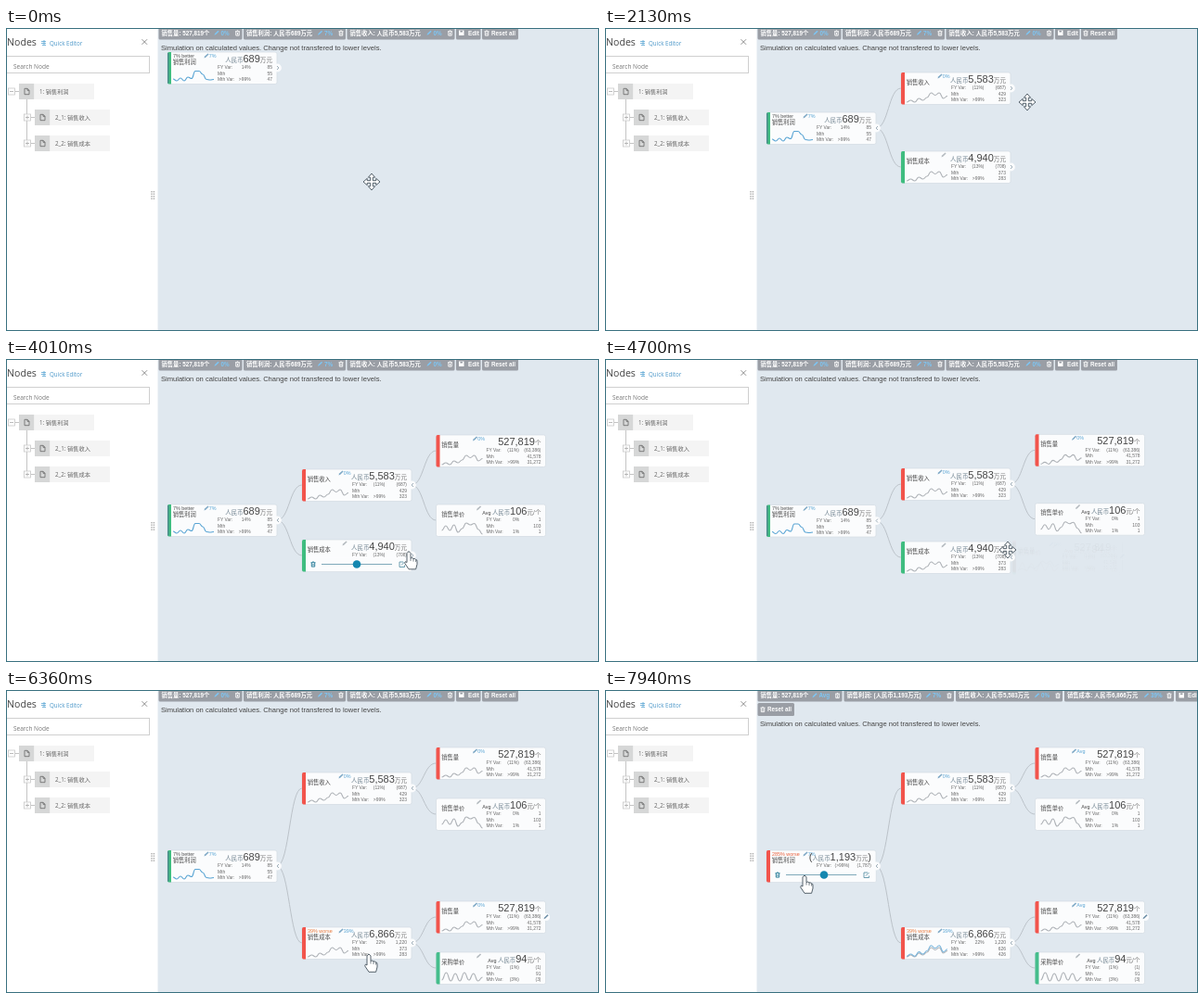
These frames come from a looping animation (639x327 px, 8 s). An HTML page:

```html
<!DOCTYPE html>
<html lang="zh">
<head>
<meta charset="utf-8">
<title>Value driver tree</title>
<style>
html, body { margin: 0; width: 100%; height: 100%; overflow: hidden; background: #e0e8ef; }
svg { display: block; }
text { font-family: "Liberation Sans", "Noto Sans CJK SC", "Noto Sans CJK", sans-serif; white-space: pre; }
.side text { font-family: "Open Sans", "Noto Sans CJK SC", "Noto Sans CJK", sans-serif; }
</style>
</head>
<body>
<svg id="stage" width="639" height="327" viewBox="0 0 639 327"></svg>
<script>
const LOOP = 8000;
const GREEN = '#3fbd80', RED = '#f2544c', BLUE = '#5aa5d4', GRAY = '#aeb2b7', SKY = '#7cc6f5';

// ---- drawing helpers ----
const rect = (x, y, w, h, fill, more = '') =>
  `<rect x="${x}" y="${y}" width="${w}" height="${h}" fill="${fill}" ${more}/>`;
const line = (d, stroke, w = 1, more = '') =>
  `<path d="${d}" fill="none" stroke="${stroke}" stroke-width="${w}" ${more}/>`;
const text = (x, y, str, size, fill = '#444', more = '') =>
  `<text x="${x}" y="${y}" font-size="${size}" fill="${fill}" ${more}>${str}</text>`;
const right = 'text-anchor="end"';
const group = (x, y, body) => `<g transform="translate(${x} ${y})">${body}</g>`;

const pencil = (x, y, color) =>
  group(x, y, `<path d="M0 5.2l.6-1.8L4 .2l1.100 1-3.400 3.300z" fill="${color}"/>`);
const trash = (x, y, color) =>
  group(x, y, line('M0 1.2H5M1.8 .4H3.2M.8 1.5V5.6H4.2V1.5M2.5 2.5V4.8', color, .9));

function spark(ys, color) {
  const step = 44 / (ys.length - 1);
  let d = `M6 ${ys[0]}`;
  for (let i = 1; i < ys.length; i++) {
    const x = 6 + i * step, mid = x - step / 2;
    d += `C${mid} ${ys[i - 1]} ${mid} ${ys[i]} ${x} ${ys[i]}`;
  }
  return line(d, color, 1.1);
}

// ---- left panel ----
function treeRow(x, y, w, label, sign) {
  const cy = y + 8.5;
  return line(`M${x - 5} ${cy}H${x}`, '#c4c4c4') +
    rect(x - 11.5, cy - 3.5, 7, 7, '#fff', 'stroke="#c8c8c8" stroke-width=".8"') +
    line(`M${x - 10} ${cy}h4` + (sign ? `M${x - 8} ${cy - 2}v4` : ''), '#aaa', .8) +
    rect(x, y, 16.5, 17, '#d6d7d7') + rect(x + 16.5, y, w - 16.5, 17, '#f4f4f4') +
    line(`M${x + 6} ${cy - 3.2}h3l2 2v4.4h-5zM${x + 9} ${cy - 3.2}v2h2`, '#666', .8) +
    text(x + 22, cy + 2.6, label, 6.2, '#666');
}

function sidePanel() {
  let dots = '';
  for (let i = 0; i < 8; i++) dots += rect(156.3 + i % 2 * 2.4, 176 + (i >> 1) * 2.5, 1.4, 1.4, '#aaa');
  return `<g class="side">${rect(0, 0, 163.5, 327, '#fff')}
    ${text(1, 19.2, 'Nodes', 10.6, '#444')}
    ${line('M38 14.5h5M38 16.5h5M39 18.5h4M41 13v5', BLUE, .8)}
    ${text(47, 19, 'Quick Editor', 6.2, '#4a96c8')}
    ${line('M146.5 12.2l5.6 5.6m0-5.6l-5.6 5.6', '#777', .8)}
    ${rect(.5, 30.5, 154, 18, '#fff', 'stroke="#cfcfcf"')}
    ${text(8, 43.6, 'Search Node', 6.5, '#777')}
    ${line('M22.5 77V124', '#c4c4c4')}
    ${treeRow(14, 60, 81, '1: 销售利润', 0)}
    ${treeRow(31, 88, 81, '2_1: 销售收入', 1)}
    ${treeRow(31, 116, 81, '2_2: 销售成本', 1)}
    ${dots}</g>`;
}

// ---- top bar ----
const barBox = (x, y, w, h) => rect(x, y, w, h, '#9a9ea5', 'rx="1.5"');
const barText = (x, y, s, fill = '#fff') => text(x, y, s, 6.3, fill, 'font-weight="bold"');

function barItem(x, w, y, label, pct) {
  const r = x + w, px = r - 19 - pct.length * 2;
  return barBox(x, -1, w, 13.5) + barText(x + 3, y, label) +
    pencil(px - 7, y - 5, SKY) + barText(px, y, pct, SKY) + trash(r - 7.5, y - 5, '#fff');
}
const saveIcon = (x, y) => rect(x, y, 5.5, 5.5, '#fff') + rect(x + 1.4, y + .4, 2.6, 1.6, '#9a9ea5');
const note = y =>
  text(167, y, 'Simulation on calculated values. Change not transfered to lower levels.', 7.57, '#444');

const barBefore = barItem(164.5, 90, 7.5, '销售量: 527,819个', '0%') +
  barItem(256, 110, 7.5, '销售利润: 人民币689万元', '7%') +
  barItem(367.5, 116, 7.5, '销售收入: 人民币5,583万元', '0%') +
  barBox(485, -1, 26.5, 13.5) + saveIcon(488, 2.5) + barText(498, 7.5, 'Edit') +
  barBox(513, -1, 39, 13.5) + trash(515.5, 2.5, '#fff') + barText(523, 7.5, 'Reset all') + note(24);

const barAfter = barItem(164.5, 91, 8, '销售量: 527,819个', 'Avg') +
  barItem(257.5, 118.5, 8, '销售利润: (人民币1,193万元)', '7%') +
  barItem(378, 115, 8, '销售收入: 人民币5,583万元', '0%') +
  barItem(495, 118, 8, '销售成本: 人民币6,866万元', '39%') +
  barBox(615, -1, 30, 13.5) + saveIcon(618.5, 3) + barText(628, 8, 'Edit') +
  barBox(164.5, 14, 39.5, 14) + trash(167.5, 18, '#fff') + barText(175, 23, 'Reset all') + note(39);

// ---- cards ----
function face(f) {
  const [fy, mth, mv] = f.rows;
  const row = (y, label, a, b) => text(54, y, label, 4.9, '#666') +
    text(89.5, y, a, 4.9, '#666', right) + text(113, y, b, 4.9, '#666', right);
  const span = (size, s, fill = '#777') => `<tspan font-size="${size}" fill="${fill}">${s}</tspan>`;
  const value = (f.avg ? span(5.4, 'Avg ', '#444') : '') + (f.neg ? span(11, '(', '#444') : '') +
    span(6.4, f.pre || '', '#6b7f8c') + span(11, f.num, '#444') + span(6.6, f.unit) + (f.neg ? span(11, ')', '#444') : '');
  return rect(0, 0, 118, 34.5, '#fbfcfd', 'rx="2" stroke="#d3dbe2" stroke-width=".7"') +
    (f.bar ? `<path d="M4 0H1.5Q0 0 0 2V32.5Q0 34.5 1.5 34.5H4Z" fill="${f.bar}"/>` : '') +
    (f.edge ? line('M.8 1V33.500', f.edge, 1.6) : '') +
    (f.note ? text(6, 5.8, f.note, 5.4, f.noteColor || '#555') : '') +
    text(5.7, 12.7, f.title, 6.3, '#4a4a4a') +
    pencil(f.pct ? 39.5 : 43.5, 1.2, f.pct ? '#7fa9c6' : '#b4babf') + (f.pct ? text(44.8, 5.9, f.pct, 5.4, BLUE) : '') +
    `<text x="113" y="11" ${right}>${value}</text>` +
    row(18.2, 'FY Var:', ...fy) + row(25, 'Mth', '', mth) + row(31.2, 'Mth Var:', ...mv) +
    (f.ghost ? spark(f.ghost, GRAY) : '') + spark(f.line, f.ink || GRAY);
}

const slider = (id, thumb) => `<g id="${id}">${rect(4.2, 19.7, 113.3, 14.4, '#fbfcfd')}
  ${trash(9.5, 23.5, '#1d7793')}${line('M21 26.5H97', '#7fa9ba', 1.2)}
  <circle class="thumb" cx="${thumb}" cy="26.5" r="4.3" fill="#1487b0"/>
  ${line('M109 24h-4v5.500h5.500v-2M107 27.500l3.500-3.500', '#5d93a8', .9)}</g>`;

const rising = [32, 30, 32, 28, 30, 27, 22, 24.5, 22, 28, 25.5];
const profitLine = [29, 31, 28, 31, 27, 28.5, 20.5, 20.5, 24, 29.5, 30, 29.5];
const priceLine = [28, 23, 28, 22, 30, 26, 20, 22, 20.5, 27, 32];
const buyLine = [30, 22, 31, 23, 31, 22, 30, 23, 31, 27];

const volume = { title: '销售量', num: '527,819', unit: '个', bar: RED, line: rising, pct: '0%',
  rows: [['(11%)', '(63,386)'], '41,578', ['>99%', '31,272']] };
const profit = { title: '销售利润', pre: '人民币', num: '689', unit: '万元', bar: GREEN, edge: '#4c8f8c',
  line: profitLine, ink: BLUE, note: '7% better', pct: '7%', rows: [['14%', '85'], '55', ['>99%', '47']] };
const revenue = { title: '销售收入', pre: '人民币', num: '5,583', unit: '万元', bar: RED, line: rising, pct: '0%',
  rows: [['(11%)', '(687)'], '429', ['>99%', '323']] };
const cost = { title: '销售成本', pre: '人民币', num: '4,940', unit: '万元', bar: GREEN, line: rising,
  rows: [['(13%)', '(708)'], '373', ['>99%', '283']] };
const costUp = { ...cost, num: '6,866', bar: RED, note: '39% worse', noteColor: '#e8793c', pct: '39%',
  rows: [['22%', '1,220'], '373', ['>99%', '283']] };
const costDone = { ...costUp, rows: [['22%', '1,220'], '626', ['>99%', '426']],
  ghost: rising, line: rising.map(y => y - (31.5 - y) * .15 - .8), ink: '#79b5dc' };
const profitDone = { ...profit, neg: 1, num: '1,193', bar: RED, edge: '', note: '285% worse', noteColor: '#e8603c',
  rows: [['(>99%)', '(1,787)'], '(198)', ['(>99%)', '(206)']] };
const price = { title: '销售单价', avg: 1, pre: '人民币', num: '106', unit: '元/个', line: priceLine,
  rows: [['0%', '1'], '103', ['1%', '1']] };
const buy = { title: '采购单价', avg: 1, pre: '人民币', num: '94', unit: '元/个', bar: '#45bd8c', line: buyLine,
  rows: [['(1%)', '(1)'], '91', ['(3%)', '(3)']] };

const CHANGE = 6150, DONE = 6620;
const volumeDone = { ...volume, pct: 'Avg' };

// y: resting height at each tree stage; born: stage at which the card slides out of its parent
// faces: [look, from, to]
const cards = {
  profit: { x: 174, y: [26, 91, 157, 173], born: 0, opens: 1,
    faces: [[profit, 0, DONE], [profitDone, DONE, LOOP]] },
  revenue: { x: 319, y: [26, 48, 119, 89], born: 1, opens: 2, from: 'profit', faces: [[revenue, 0, LOOP]] },
  cost: { x: 319, y: [26, 133, 195, 256], born: 1, opens: 3, from: 'profit',
    faces: [[cost, 0, CHANGE], [costUp, CHANGE, DONE], [costDone, DONE, LOOP]] },
  volume: { x: 463.5, y: [48, 48, 82, 62], born: 2, from: 'revenue', faces: [[volume, 0, DONE], [volumeDone, DONE, LOOP]] },
  price: { x: 463.5, y: [48, 48, 157, 117], born: 2, from: 'revenue', faces: [[price, 0, LOOP]] },
  volume2: { x: 463.5, y: [195, 195, 195, 228], born: 3, from: 'cost', edit: 1,
    faces: [[volume, 0, DONE], [volumeDone, DONE, LOOP]] },
  buy: { x: 463.5, y: [195, 195, 195, 283], born: 3, from: 'cost', faces: [[buy, 0, LOOP]] }
};
const sliders = { profit: 62, revenue: 59, cost: 59 };

// ---- shown only within time windows ----
const shown = {
  barBefore: [[0, DONE]], barAfter: [[DONE, LOOP]],
  'slide-revenue': [[2560, 3030]],
  'slide-cost': [[3600, 4650], [5530, CHANGE], [DONE, 7200]],
  'slide-profit': [[7680, LOOP]],
  hand: [[800, 1330], [2560, 3080], [3600, 4700], [5530, LOOP]],
  cross: [[0, 800], [1330, 2560], [3080, 3600], [4700, 5530]]
};

function cardMarkup(id) {
  const c = cards[id];
  const looks = c.faces.map(([f, a, b], i) => {
    shown[`${id}-${i}`] = [[a, b]];
    return `<g id="${id}-${i}">${face(f)}</g>`;
  }).join('');
  const knob = c.opens
    ? `<circle cx="118.500" cy="17" r="4.400" fill="#fbfcfd"/>` +
      group(119, 17, `<path class="chev" d="M-1-2L.9 0-1 2" fill="none" stroke="#93a4b0" stroke-width=".9"/>`)
    : c.edit ? `<circle cx="118.500" cy="17" r="4" fill="#fbfcfd"/>` + pencil(116, 14, '#6a8ca5') : '';
  return `<g id="${id}">${looks}${id in sliders ? slider('slide-' + id, sliders[id]) : ''}${knob}</g>`;
}

const arm = 'L-1.300-1.300V-4.800H-3.600L0-9 3.600-4.800H1.300V-1.300H4.800V-3.600L9 0 4.800 3.600V1.300H1.300V4.800H3.600L0 9-3.600 4.800H-1.300V1.300H-4.800V3.600L-9 0-4.800-3.600V-1.300Z';
const pointer = `<g id="pointer" stroke="#44525c" stroke-width=".9" stroke-linejoin="round" fill="#fff">
  <path id="cross" d="M-1.300-1.300${arm}"/>
  <g id="hand"><path d="M-2 2Q0-1.500 2 2V7.500Q4 6.300 5 8Q7 7.300 7.600 9Q9.200 8.700 9 11V14L7.600 19.300H0L-4.300 12.800Q-4 9.800-2 12Z"/>
  <path d="M2 7.500v3M5 8v3M7.600 9v2.500" fill="none" stroke-width=".7"/></g></g>`;

const ids = Object.keys(cards);
const stage = document.getElementById('stage');
stage.innerHTML = rect(0, 0, 639, 327, '#e0e8ef') +
  `<g id="barBefore">${barBefore}</g><g id="barAfter">${barAfter}</g>` + sidePanel() +
  ids.filter(id => cards[id].from).map(id => line('', '#b7bec5', .9, `id="link-${id}"`)).join('') +
  ids.slice().reverse().map(cardMarkup).join('') +
  rect(.5, .5, 638, 326, 'none', 'stroke="#39707f"') + pointer;

// ---- motion ----
const $ = id => document.getElementById(id);
const ease = u => u < .5 ? 4 * u ** 3 : 1 - 4 * (1 - u) ** 3;
const clamp = u => Math.min(1, Math.max(0, u));
const opensAt = [0, 1300, 3006, 4600];
const progress = (stage, t) => stage ? ease(clamp((t - opensAt[stage]) / 500)) : 1;

const path = [
  [0, 394, 166], [70, 394, 166], [830, 297, 41], [1330, 297, 41], [1990, 432, 72], [2130, 455, 80],
  [2350, 458, 88], [2600, 437, 64], [3080, 437, 64], [3310, 441.5, 79], [3640, 428, 208], [3800, 434, 208],
  [4490, 434, 206], [4700, 434, 206], [5000, 439, 234], [5400, 439, 234], [5650, 379, 282],
  [5720, 379, 282], [6080, 391, 285], [7100, 391, 285], [7870, 215, 200], [LOOP, 215, 200]
];

function along(t) {
  const i = path.findIndex(p => p[0] > t);
  const [t0, x0, y0] = path[i - 1], [t1, x1, y1] = path[i];
  const u = (t - t0) / (t1 - t0), s = u * u * (3 - 2 * u);
  return [x0 + (x1 - x0) * s, y0 + (y1 - y0) * s];
}

function draw(t) {
  const k = [0, 1, 2, 3].map(s => progress(s, t));
  const at = {};
  for (const id of ids) {
    const c = cards[id], grow = k[c.born];
    let y = c.y[0];
    for (let s = 1; s < 4; s++) y += (c.y[s] - c.y[s - 1]) * k[s];
    const x = c.x - 25.5 * (1 - grow);
    at[id] = [x, y];
    const el = $(id);
    el.setAttribute('transform', `translate(${x} ${y})`);
    el.setAttribute('opacity', grow);
    if (c.opens) el.querySelector('.chev').setAttribute('transform', t >= opensAt[c.opens] ? 'scale(-1 1)' : '');
    if (c.from) {
      const [px, py] = at[c.from], x0 = px + 118, y0 = py + 17, y1 = y + 17, mid = (x0 + x) / 2;
      const link = $('link-' + id);
      link.setAttribute('d', `M${x0} ${y0}C${mid} ${y0} ${mid} ${y1} ${x} ${y1}`);
      link.setAttribute('opacity', grow);
    }
  }
  for (const id in shown)
    $(id).style.display = shown[id].some(([a, b]) => t >= a && t < b) ? '' : 'none';

  const [x, y] = along(t);
  $('pointer').setAttribute('transform', `translate(${x} ${y})`);
  const drag = t < 5720 ? 59 : t < 6080 ? x - 320 : 71;
  $('slide-cost').querySelector('.thumb').setAttribute('cx', drag);
}

const start = performance.now();
function tick() {
  draw((performance.now() - start) % LOOP);
  requestAnimationFrame(tick);
}
tick();
</script>
</body>
</html>
```
